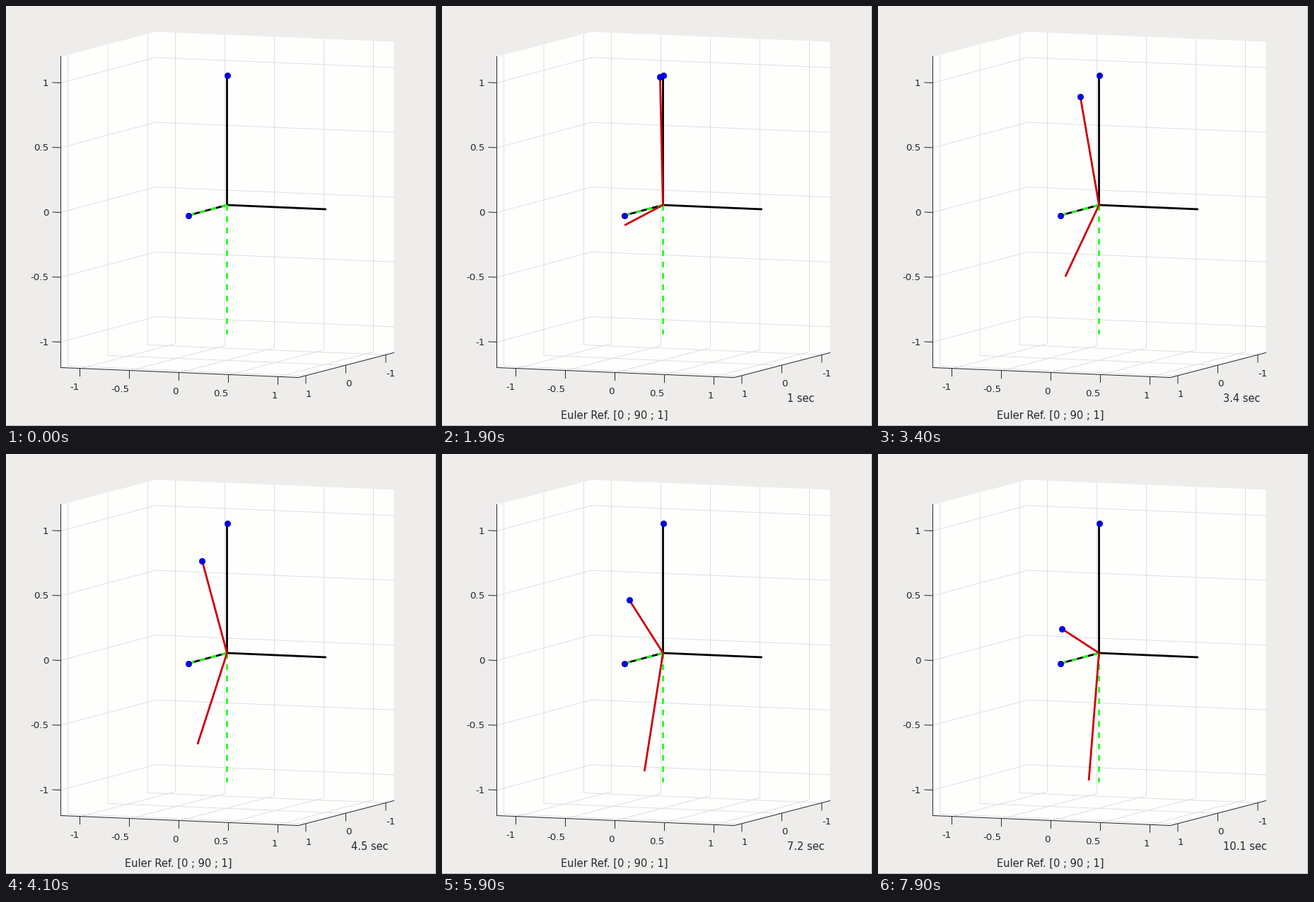
Recreate the animation shown at these times as a matplotlib script. Size 608x593 px, loop 8000 ms.

```python
import numpy as np
import matplotlib.pyplot as plt
from matplotlib.animation import FuncAnimation
from matplotlib.patches import Polygon

W, H = 608, 593
FRAMES, STEP = 80, 100
START, LABEL = 11, 13          # frames where the body axes and the clock appear
PAUSES = (12, 15, 45, 70, 76)  # frames in which the simulation stands still
INK, GRID = "#262626", "#dfdfde"
RED, GREEN, BLUE = "#cc000a", "#1cff1c", "#0000f0"

plt.rcParams.update({"font.family": "DejaVu Sans", "path.snap": False})

# 72 dpi makes one point equal one pixel; whole numbers fall on pixel centres
fig = plt.figure(figsize=((W + 1e-4) / 72, (H + 1e-4) / 72), dpi=72,
                 facecolor="#eeedeb")
ax = fig.add_axes([0, 0, 1, 1])
ax.set(xlim=(0.5, W + 0.5), ylim=(H + 0.5, 0.5))
ax.axis("off")

# Screen vectors of the unit axes
ORIGIN = np.array([313, 281.5])
EX = np.array([-54.5, 14.6])
EY = np.array([140.3, 6])
EZ = np.array([0, -182.5])


def line(p, q, color, width=1.0, z=1, **kw):
    return ax.plot([p[0], q[0]], [p[1], q[1]], color=color, lw=width, zorder=z,
                   solid_capstyle="butt", dash_capstyle="butt", **kw)[0]


def axis_line(vec, color, z, **kw):
    return line(ORIGIN, ORIGIN + vec, color, 2.8, z, **kw)


def dot(pos):
    return ax.plot([pos[0]], [pos[1]], "o", mfc=BLUE, mec="#000090", mew=0.7,
                   ms=8.3, zorder=8)[0]


def text(x, y, s, size=13.33, ha="left"):
    return ax.text(x, y, s, color=INK, fontsize=size, ha=ha, va="baseline",
                   zorder=5)


def draw_box():
    ax.add_patch(Polygon([(78, 72), (212, 37), (549, 51), (549, 490),
                          (414, 525), (78, 511)], fc="#fefefd", ec="none"))

    for k in range(5):
        name = f"{k / 2 - 1:g}"
        x, y = 240 + 70 * k, 38.2 + 2.9 * k
        line((x, y), (x, y + 439), GRID)
        line((x, y + 439), (x - 135, y + 474.3), GRID)
        line((x - 135, y + 474.3), (x - 135, y + 485.5), INK, z=3)
        text(x - 135.5, 542 + 3 * k, name, ha="right")

        h = 475 - 91.5 * k
        ax.plot([78, 212, 549], [h, h - 35.8, h - 21.6], color=GRID, lw=1)
        line((66, h - 0.5), (78, h), INK, z=3)
        text(61, h + 4.2, name, ha="right")

    for k in range(3):
        x, y = 201 - 56.5 * k, 40 + 14.9 * k
        line((x, y), (x, y + 439), GRID)
        line((x, y + 439), (x + 336.5, y + 453), GRID)
        line((x + 336.5, y + 453), (x + 336.5, y + 464), INK, z=3)
        text(x + 336.5, 523 + 14.6 * k, f"{k - 1}")

    ax.plot([78, 78, 414, 549], [72, 511, 525, 490], color=INK, lw=1, zorder=3)
    ax.plot([W, W, 0], [0, H, H], color="#b9b8b6", lw=1, zorder=3)


def clock(i):
    """Simulated seconds, shown to one decimal."""
    n = i - START - sum(p <= i for p in PAUSES)
    return round(float(np.interp(n, [0, 21, 37, 53, 63], [0, 3.4, 6, 8.4, 10.1])), 1)


def pitch(t):
    """Overdamped response towards 90 degrees."""
    return np.radians(90 - 151 * np.exp(-0.225 * t) + 61 * np.exp(-0.556 * t))


draw_box()
for vec in (EX, EY, EZ):
    axis_line(vec, "black", 4)
for vec in (EX, -EZ):
    axis_line(vec, GREEN, 5, ls=(0, (8 / 2.8, 8 / 2.8)))
dot(ORIGIN + EX)
dot(ORIGIN + EZ)

body_x = axis_line(EX, RED, 6)
body_z = axis_line(EZ, RED, 6)
body_dot = dot(ORIGIN + EZ)
ref = text(168.5, 583, "Euler Ref. [0 ; 90 ; 1]", 14.67)
time_label = text(488.5, 559, "", 14.67)
body = (body_x, body_z, body_dot, ref)


def update(i):
    for artist in body:
        artist.set_visible(i >= START)
    t = clock(i)
    c, s = np.cos(pitch(t)), np.sin(pitch(t))
    tip_x = ORIGIN + c * EX - s * EZ
    tip_z = ORIGIN + s * EX + c * EZ
    body_x.set_data(*zip(ORIGIN, tip_x))
    body_z.set_data(*zip(ORIGIN, tip_z))
    body_dot.set_data([tip_z[0]], [tip_z[1]])
    time_label.set_text(f"{t:g} sec" if i >= LABEL else "")
    return (*body, time_label)


anim = FuncAnimation(fig, update, frames=FRAMES, interval=STEP,
                     repeat=True, repeat_delay=0, blit=False)
plt.show()
```
